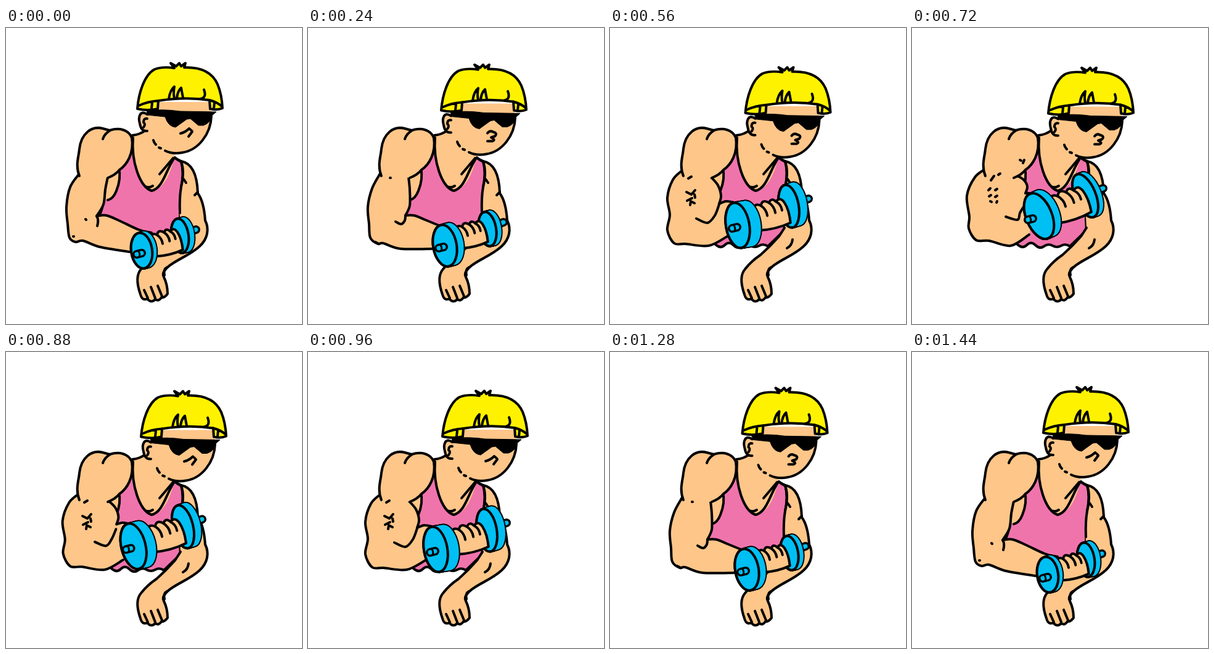
Recreate the animation shown at these times as an HTML page with a canvas. Size 480 px wide and 480 px high, loop 1600 ms.

```html
<!DOCTYPE html>
<html lang="en">
<head>
<meta charset="utf-8">
<title>Dumbbell curl</title>
<style>
html, body { margin: 0; height: 100%; overflow: hidden; background: #fff; }
canvas { display: block; width: 480px; height: 480px; }
</style>
</head>
<body>
<canvas id="stage" width="480" height="480"></canvas>
<script>
const ctx = document.getElementById('stage').getContext('2d');
const SKIN = '#fec689', PINK = '#f074ac', YELLOW = '#fff200', BLUE = '#00bff3', INK = '#000';
const STEP = 80, LOOP = 1600, LAST = 18;

// Arm lines are x,y pairs; disc: x, y, rx, ry, tilt, depth x, depth y.
const low = {
  outer: [119,236, 104,258, 98,290, 100,318, 103,340, 113,347, 125,345, 152,355, 200,363],
  top: [236,332, 215,327, 185,313, 163,304, 147,305],
  inner: [147,305, 158,286, 161,262, 165,242],
  crease: [147,305, 149,310, 149,316, 148,321],
  near: [220,361, 17,29, -8, 7,-2], far: [282,337, 14,28, -8, 9,-2],
  nubs: [212,367, 308,327], hand: [260,345, -15, 1],
  marks: 'M129 310l1 1M109 338h1'
};
const rising = {
  outer: [117,236, 104,260, 97,290, 99,318, 101,340, 113,350, 122,349, 150,358, 203,358],
  top: [225,325, 207,318, 190,311, 172,304, 158,304],
  inner: [158,304, 165,288, 165,262, 163,242],
  crease: [158,304, 157,312, 151,318, 142,314],
  near: [222,353, 19,34, -10, 11,-3], far: [291,326, 14,28, -10, 8,-2],
  nubs: [212,357, 317,315], hand: [265,332, -15, 1],
  marks: 'M133 243h1M109 347l6 3'
};
const middle = {
  outer: [116,232, 103,252, 94,285, 97,315, 98,338, 112,350, 125,349, 155,359, 200,350],
  top: [212,299, 205,295, 190,290, 175,290, 162,294],
  inner: [162,294, 169,278, 168,258, 163,242],
  crease: [162,294, 156,311, 147,322, 130,316],
  near: [216,339, 16,32, -10, 17,-4], far: [297,305, 14,28, -14, 11,-4],
  nubs: [207,341, 324,294], hand: [268,315, -15, 1],
  marks: 'M104 329Q111 330 112 336M129 242l4-1'
};
const high = {
  outer: [117,231, 102,246, 93,275, 97,303, 93,328, 104,349, 122,350, 160,353, 190,338],
  top: [215,288, 205,284, 197,282, 188,281, 177,285],
  inner: [177,285, 180,272, 175,255, 164,242],
  crease: [177,286, 170,304, 158,316, 140,309],
  near: [207,320, 19,37, -10, 18,-3], far: [290,289, 16,35, -10, 13,-4],
  nubs: [198,325, 322,277], hand: [262,299, -15, 1.15],
  marks: 'M124 266l8 4 6-7M125 280l8-4M130 287l1-6 6 3M137 270l1 5M127 244l5-3'
};
const peak = {
  outer: [120,228, 102,242, 89,272, 93,306, 92,325, 104,344, 125,345, 160,353, 190,335],
  top: [205,275, 200,271, 195,270, 190,268, 184,268],
  inner: [184,268, 187,257, 181,246, 168,238],
  crease: [181,290, 175,300, 171,311, 152,306],
  near: [206,305, 21,39, -22, 11,-5], far: [281,272, 17,37, -22, 8,-3],
  nubs: [188,311, 310,260], hand: [256,283, -20, 1.25],
  marks: 'M128 247l5-7M140 238l3-2M124 263l3-3M135 263l3-2M125 273l3-2M135 274l3-2M127 281l2 1M137 283l1-2M175 214l2 1M180 219l2-5'
};
const armKeys = [[0, low], [3, rising], [5, middle], [7, high], [9, peak],
  [12, high], [14, middle], [16, rising], [18, low]];
const headKeys = [[0, [0,0]], [3, [3,2.5]], [5, [5,6]], [9, [8,7.5]], [12, [5,6]], [14, [3,2.5]], [18, [0,0]]];

const mix = (a, b, k) => a.map((v, i) => v + (b[i] - v) * k);

function between(keys, n) {
  let i = 0;
  while (i < keys.length - 2 && n >= keys[i + 1][0]) i++;
  const [from, a] = keys[i], [to, b] = keys[i + 1];
  return [a, b, (n - from) / (to - from)];
}

function paint(path, fill, stroke = INK, width = 4) {
  const p = typeof path === 'string' ? new Path2D(path) : path;
  if (fill) { ctx.fillStyle = fill; ctx.fill(p); }
  if (stroke) { ctx.strokeStyle = stroke; ctx.lineWidth = width; ctx.stroke(p); }
}

// Smooth curve through the points; "joined" continues an earlier curve.
function curve(v, joined) {
  const count = v.length / 2;
  const pt = i => { i = Math.max(0, Math.min(count - 1, i)); return [v[2 * i], v[2 * i + 1]]; };
  let d = (joined ? 'L' : 'M') + pt(0);
  for (let i = 0; i < count - 1; i++) {
    const [p, a, b, q] = [pt(i - 1), pt(i), pt(i + 1), pt(i + 2)];
    d += 'C' + [a[0] + (b[0] - p[0]) / 6, a[1] + (b[1] - p[1]) / 6,
      b[0] - (q[0] - a[0]) / 6, b[1] - (q[1] - a[1]) / 6, ...b];
  }
  return d;
}

function disc([x, y, rx, ry, tilt, dx, dy]) {
  const slice = k => {
    const p = new Path2D();
    p.ellipse(x + dx * k, y + dy * k, rx, ry, tilt * Math.PI / 180, 0, 7);
    return p;
  };
  for (let k = 1; k >= 0; k -= 1 / 16) paint(slice(k), null);
  for (let k = 1; k >= 0; k -= 1 / 16) paint(slice(k), BLUE, null);
  paint(slice(0), BLUE);
}

function nub(x, y, dx, dy) {
  const line = `M${x} ${y}l${dx} ${dy}`;
  paint(line, null, INK, 14);
  paint(line, null, BLUE, 7);
}

function hand([x, y, turn, size]) {
  ctx.save();
  ctx.translate(x, y);
  ctx.rotate(turn * Math.PI / 180);
  ctx.scale(size, size);
  const w = 4 / size;
  paint('M-24 20L-24-10Q-20-20-12-13Q-8-22 0-14Q5-21 10-13Q17-19 21-9Q25 3 22 21Q0 25-24 20Z', SKIN, INK, w);
  paint('M-12-13Q-6-6-7 3M0-14Q6-7 5 2M10-13Q16-7 15 1', null, INK, w);
  ctx.restore();
}

function torso() {
  paint('M204 176L272 210L284 216Q289 235 284 258L282 310L283 328L256 354q-7-5-14-1t-14 0t-14 1t-14-2t-14 0t-16-2L152 303Q160 285 165 240Z', PINK);
  paint('M205 174L226 165L275 203L272 212C266 240 254 262 236 264C218 256 204 224 206 190Z', SKIN, null);
  paint('M226 166Q217 173 205 174M206 178C203 215 216 257 236 264C254 260 258 234 272 212M226 257Q232 260 238 256M249 237L271 211', null);
  paint('M165 240L184 226Q186 244 179 264Q173 279 161 278Z', SKIN, null);
  paint('M183 227Q187 244 179 264Q174 277 165 279', null);
}

function restingArm(showCrease) {
  paint('M284 216C300 219 310 234 311 268C320 280 322 297 323 312C330 326 327 342 314 354C297 370 270 378 260 390Q252 398 256 404Q262 416 262 431Q257 438 252 437Q248 444 242 440Q235 447 229 439Q221 443 218 432C212 415 211 400 219 391Q229 378 244 368Q260 354 274 338L283 324L281 290Q281 265 288 244Z', SKIN, null);
  paint('M274 210Q280 216 284 216C300 219 310 234 311 268C320 280 322 297 323 312C330 326 327 342 314 354C297 370 270 378 260 390Q252 398 256 404Q262 416 262 431Q257 438 252 437Q248 444 242 440Q235 447 229 439Q221 443 218 432C212 415 211 400 219 391Q229 378 244 368Q260 354 274 338L283 324', null);
  paint('M284 217Q290 232 284 258Q281 275 282 300M288 245l4 6M311 266l-5 5M257 401Q255 391 261 388M224 425l6 13M235 420l7 18M246 418l7 17', null);
  if (showCrease) paint('M296 343Q295 353 287 357', null);
}

function head([dx, dy], pout) {
  ctx.save();
  ctx.translate(dx, dy);
  paint('M229 120H331L333 143C332 170 314 198 286 202Q270 204 258 199L228 182Z', SKIN, null);
  paint('M333 143C332 172 312 198 286 202Q270 205 258 199', null);
  paint('M229 140C217 132 214 145 217 155Q219 168 229 167', SKIN);
  paint('M229 147Q223 146 223 153Q227 156 223 161M239 182q1 4 4 7M248 194l3 1', null);
  paint('M213 131C215 106 224 76 241 67Q254 62 273 65L267 57L276 62L281 57L284 62L291 57L289 64C318 63 335 73 343 91Q350 108 351 130Q342 134 331 131L330 117Q290 111 247 118L246 131Q230 135 213 131Z', YELLOW);
  paint('M215 126Q230 119 247 118M330 117Q342 120 350 127M237 121l-1 10M338 121l-1 10M264 115Q266 101 273 95Q271 106 273 114M277 114Q278 103 284 97L287 113M315 115Q326 113 321 100', null);
  paint('M229 134Q255 131 282 135L341 136L334 142Q332 154 320 158L312 158L299 147L293 148L275 161Q263 160 258 144L229 141Z', INK, INK, 1);
  paint(pout ? 'M288 168Q292 163 297 166Q305 168 300 173L294 175Q302 179 296 181L288 181'
    : 'M283 171Q291 169 297 163M297 163Q301 166 302 168L296 176', null);
  ctx.restore();
}

function liftingArm(arm) {
  paint(curve(arm.outer) + curve(arm.top, true) + curve(arm.inner, true) + 'Z', SKIN, null);
  for (const part of ['outer', 'top', 'inner', 'crease']) paint(curve(arm[part]), null);
  const shoulder = 'M119 240C112 222 118 209 119 196C122 171 139 158 157 163L168 166C184 161 199 165 204 178C208 203 196 222 184 230Q178 238 165 243';
  paint(shoulder + 'Z', SKIN, null);
  paint(shoulder + 'M169 166Q160 171 157 180', null);
  paint(arm.marks, null);
}

function dumbbell({ near, far, nubs: [lx, ly, rx, ry], hand: grip }) {
  nub(rx - 8, ry + 3, 8, -3);
  disc(far);
  hand(grip);
  disc(near);
  nub(lx, ly, 8, -2);
  paint(`M${lx + 3} ${ly - 5}q3 5 1 9`, null, INK, 3);
}

function draw(n) {
  const [a, b, k] = between(armKeys, n);
  const arm = { marks: (k < 0.5 ? a : b).marks };
  for (const part in a) if (part !== 'marks') arm[part] = mix(a[part], b[part], k);
  const pout = (n > 1 && n < 11) || (n > 12 && n < 17);
  ctx.fillStyle = '#fff';
  ctx.fillRect(0, 0, 480, 480);
  ctx.lineCap = ctx.lineJoin = 'round';
  torso();
  restingArm(n > 3 && n < 16);
  head(mix(...between(headKeys, n)), pout);
  liftingArm(arm);
  dumbbell(arm);
}

function tick() {
  draw(Math.min(LAST, Math.floor(performance.now() % LOOP / STEP)));
  requestAnimationFrame(tick);
}
tick();
</script>
</body>
</html>
```
